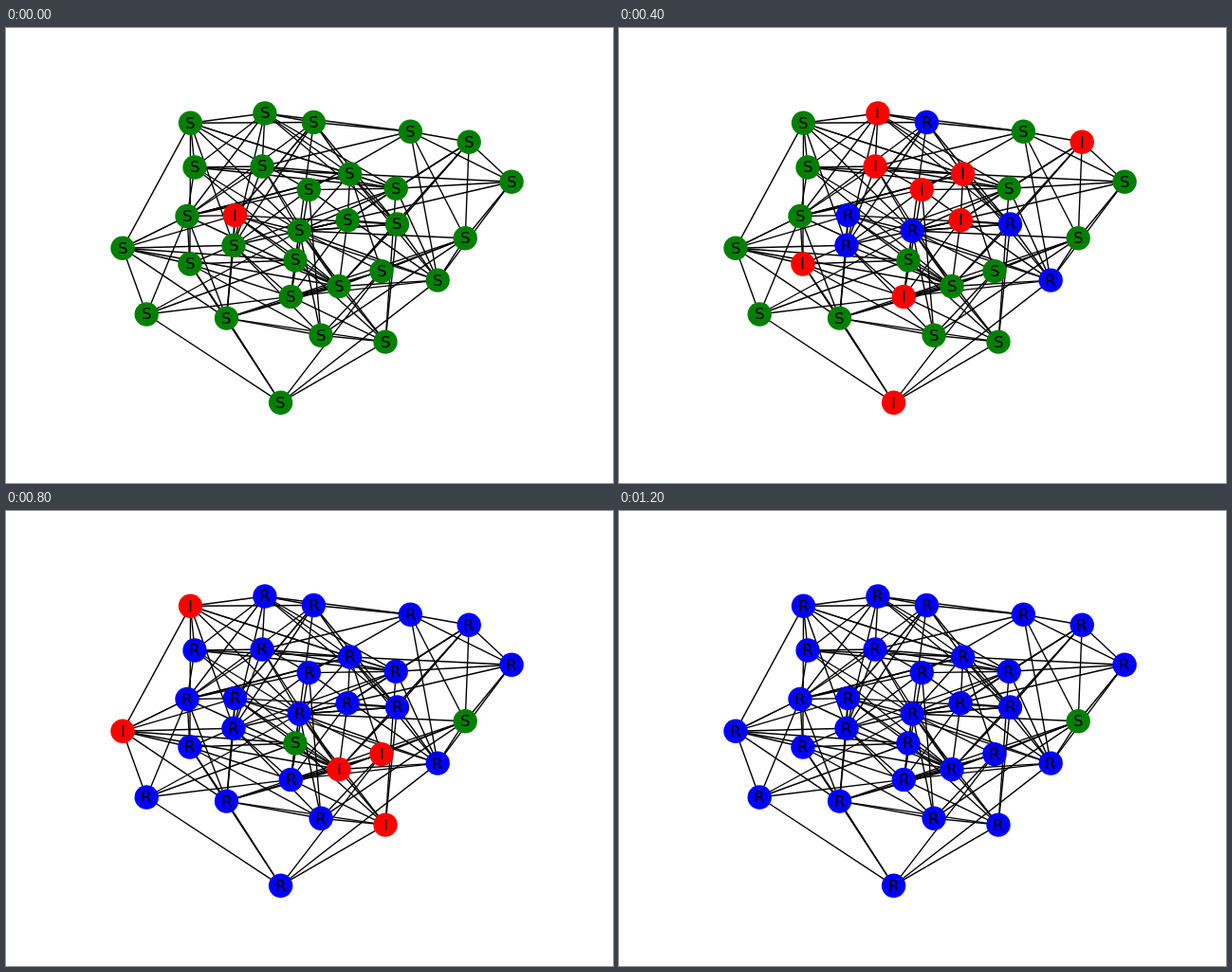
Recreate the animation shown at these times as an HTML page with a canvas. Size 640 by 480 pixels, loop 1400 ms.

```html
<!DOCTYPE html>
<html lang="en">
<head>
<meta charset="utf-8">
<title>Epidemic on a network</title>
<style>
  html, body { margin: 0; width: 100%; height: 100%; overflow: hidden; background: #fff; }
  canvas { display: block; }
</style>
</head>
<body>
<canvas id="stage" width="640" height="480"></canvas>
<script>
const STEP = 200, STEPS = 7, NEVER = 9;
const ctx = document.getElementById('stage').getContext('2d');
const COLORS = { S: '#008000', I: '#ff0000', R: '#0000ff' };

// id: [x, y, step of infection, linked ids]
const nodes = {
  a: [194.5, 100.2, 4, 'bcgtrsnijk'],
  b: [272.9, 90, 2, 'cdghsjpkl'],
  c: [324.4, 99.5, 1, 'djpmsln'],
  d: [426.4, 109.3, 3, 'efhiqx'],
  e: [488.2, 120.3, 2, 'fqkpow'],
  f: [533.1, 162.2, 3, 'jkxnq'],
  g: [199, 147, 3, 'hjkwnl'],
  h: [270.1, 146, 2, 'jklsnw'],
  i: [319.3, 170.6, 2, 'lskyBx'],
  j: [362.7, 154, 2, 'lnopxvk'],
  k: [411.2, 169.2, 3, 'onCsx'],
  l: [191, 198.5, 3, 'mrztAwj'],
  m: [241.5, 197.6, 0, 'cnspxwAu'],
  n: [309.3, 214, 1, 'yuBxvwCpzq'],
  o: [360.2, 202.7, 2, 'pnwsy'],
  p: [412.5, 207, 1, 'Cxwn'],
  q: [484.2, 221.7, NEVER, 'vwyxB'],
  r: [123, 232.2, 4, 'mlsuwAzt'],
  s: [240, 229.2, 1, 'AywB'],
  t: [193.9, 249, 2, 'DAuBsy'],
  u: [305, 245, 5, 'yCwz'],
  v: [396, 256.6, 4, 'AyDB'],
  w: [351, 272.5, 4, 'CAyx'],
  x: [455.2, 266.1, 1, 'Dy'],
  y: [300.3, 283.4, 2, 'AzC'],
  z: [148.2, 302, 3, 'D'],
  A: [232.5, 306.1, 3, 'BCD'],
  B: [332.1, 324.2, 3, 'C'],
  C: [400, 331.1, 4, 'D'],
  D: [289.6, 395.2, 2, '']
};
const list = Object.values(nodes);

function drawLinks() {
  ctx.strokeStyle = '#000';
  ctx.lineWidth = 1.39;
  for (const [x, y, , links] of list) {
    for (const id of links) {
      ctx.beginPath();
      ctx.moveTo(x, y);
      ctx.lineTo(nodes[id][0], nodes[id][1]);
      ctx.stroke();
    }
  }
}

function drawNode([x, y, caught], step) {
  const state = step < caught ? 'S' : step === caught ? 'I' : 'R';
  ctx.fillStyle = COLORS[state];
  ctx.beginPath();
  ctx.arc(x, y, 12.7, 0, Math.PI * 2);
  ctx.fill();
  ctx.fillStyle = '#000';
  const left = x - ctx.measureText(state).width / 2;
  ctx.fillText(state, Math.round(left), Math.round(y + 5.4));
}

function draw(step) {
  ctx.fillStyle = '#fff';
  ctx.fillRect(0, 0, 640, 480);
  drawLinks();
  ctx.font = '16.67px "DejaVu Sans", sans-serif';
  for (const node of list) drawNode(node, step);
}

function tick() {
  draw(Math.floor(performance.now() / STEP) % STEPS);
  requestAnimationFrame(tick);
}
tick();
</script>
</body>
</html>
```
